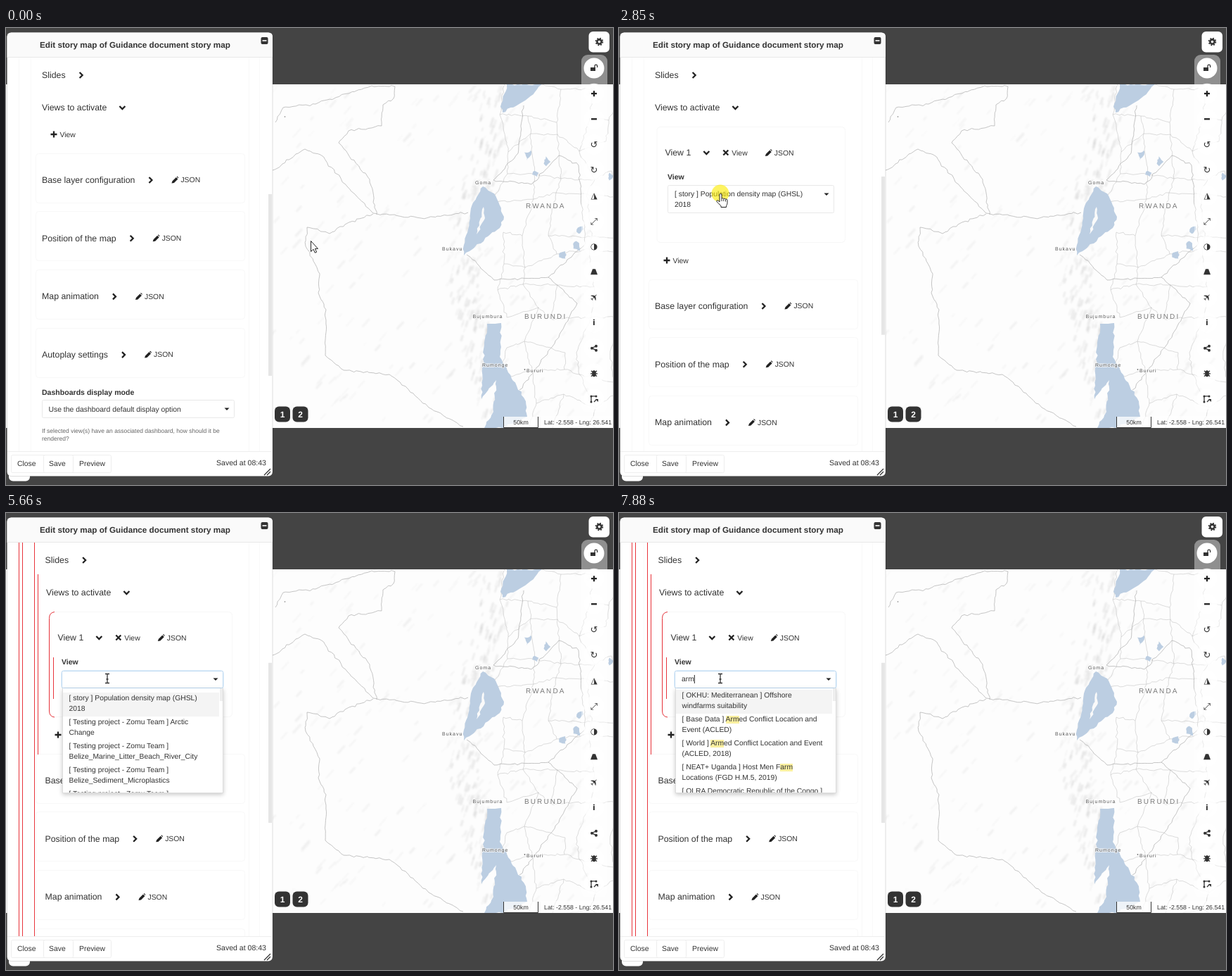
Write an HTML page that moves like this. It is 863 px wide and 649 px high and loops after 8000 ms.

```html
<!DOCTYPE html>
<html lang="en">
<head>
<meta charset="utf-8">
<title>Story map editor</title>
<style>
html, body { margin: 0; width: 863px; height: 649px; overflow: hidden; background: #444; }
svg { position: absolute; left: 0; top: 0; }
svg, #menu { font-family: "Liberation Sans", Arial, sans-serif; text-rendering: geometricPrecision; }
.tools { font-family: "DejaVu Sans", sans-serif; font-size: 13px; text-anchor: middle; }
.line { fill: none; stroke: #333; stroke-width: 1.3; }
.mark { fill: none; stroke: #222; stroke-width: 2.3; }
#menu { position: absolute; box-sizing: border-box; overflow: hidden; background: #fff; color: #333;
  border: 1px solid #ddd; border-top: 0; box-shadow: 0 2px 6px rgba(0,0,0,.22);
  font-size: 10.35px; line-height: 14.75px; white-space: nowrap; }
#menu p { margin: 0 5px 0 0; padding: 2.25px 0 2.25px 9px; }
#menu p:first-of-type { background: #f4f4f4; }
#menu i { position: absolute; right: 0; top: 0; width: 4px; height: 18px; background: #eee; }
mark { background: #faf0a0; color: inherit; }
</style>
</head>
<body>
<svg id="scene" width="863" height="649"></svg>
<div id="menu"></div>
<svg id="pointer" width="863" height="649"></svg>
<script>
const $ = id => document.getElementById(id);
const text = (x, y, s, size = 10.4, attr = '') =>
  `<text x="${x}" y="${y + size * .36}" font-size="${size}" ${attr}>${s}</text>`;
const rect = (x, y, w, h, fill, attr = '') =>
  `<rect x="${x}" y="${y}" width="${w}" height="${h}" fill="${fill}" ${attr}/>`;
const path = (d, attr = '') => `<path d="${d}" ${attr}/>`;
const at = (x, y, s) => `<g transform="translate(${x} ${y})">${s}</g>`;
const bold = 'font-weight="bold"';
const frame = (x, y, w, h, color, r = 2) => rect(x + .5, y + .5, w, h, 'none', `stroke="${color}" rx="${r}"`);

const pen = document.createElement('canvas').getContext('2d');
pen.textRendering = 'geometricPrecision';
function widthOf(s, size) {
  pen.font = `${size}px "Liberation Sans", Arial, sans-serif`;
  return pen.measureText(s).width;
}

let seed = 7;
const rnd = () => (seed = seed * 16807 % 2147483647) / 2147483647;
const jitter = size => (rnd() - .5) * size;

// Joins "x,y x,y ..." with small random kinks along each segment
function rough(points, kink = 3) {
  const p = points.split(' ').map(s => s.split(',').map(Number));
  let d = 'M' + p[0];
  for (let i = 1; i < p.length; i++) {
    const [ax, ay] = p[i - 1], [bx, by] = p[i];
    const n = Math.ceil(Math.hypot(bx - ax, by - ay) / 5);
    for (let k = 1; k <= n; k++) {
      const j = k < n ? kink : 0;
      d += `L${(ax + (bx - ax) * k / n + jitter(j)).toFixed(1)} ${(ay + (by - ay) * k / n + jitter(j)).toFixed(1)}`;
    }
  }
  return d;
}

const lakes = [
  '712,80 762,80 738,103 706,120 703,112 712,80',
  '678,225 694,235 708,268 702,284 685,296 651,323 651,308 660,270 662,253 678,225',
  '684,420 704,419 702,467 739,530 741,552 706,568 680,568 693,545 697,500 676,527 680,450 684,420'
];
const island = '679,254 669,293 681,270 679,254';
const ponds = '752,206 742,180 769,190 812,310 792,322 817,286 859,210';
const borders = [
  '383,134 394,113 440,108 520,82 553,83 551,100 536,109 534,139 487,146 473,163 517,215 527,265',
  '379,202 425,172 447,180 485,225 522,263 590,270 657,262',
  '522,264 482,279 460,292 428,283 426,310 446,349 444,376 455,400 454,465 480,486 545,492 605,541 650,566',
  '736,110 728,178 693,216 747,222 786,181 814,195 824,306 771,354 694,358 655,322',
  '771,354 812,391 780,448 730,514'
];

// District outlines: a shaken grid of nodes, joined to the next ones across and down
function districts() {
  const cell = 41, nodes = [];
  for (let r = 0; r < 13; r++)
    nodes.push([0, 1, 2, 3, 4].map(c => [702 + c * cell + jitter(28), 80 + r * cell + jitter(28)].map(Math.round)));
  return nodes.flatMap((row, r) => row.flatMap((n, c) =>
    [row[c + 1], nodes[r + 1] && nodes[r + 1][c]].filter(m => m && rnd() < .8).map(m => `${n} ${m}`)));
}

function pond(p) {
  const [x, y] = p.split(',').map(Number);
  const rim = [...Array(7).keys()].map(i => {
    const a = i / 7 * Math.PI * 2, r = 2.5 + rnd() * 6;
    return `${x + r * .8 * Math.cos(a)},${y + r * Math.sin(a)}`;
  });
  return [...rim, rim[0]].join(' ');
}

// Short soft strokes, half of them gathered along the rift valley
function hills() {
  let s = '';
  for (let i = 0; i < 460; i++) {
    const rift = i % 2, y = 82 + rnd() * 480;
    const x = rift ? 676 + 24 * Math.cos((y - 80) / 80) + jitter(44) : 382 + rnd() * 470;
    const l = 3 + rnd() * 9;
    s += path(`M${x.toFixed(1)} ${y.toFixed(1)}l${(-l * (rift ? .3 : .9)).toFixed(1)} ${l.toFixed(1)}`,
      `stroke-opacity="${((rift ? .045 : .02) + rnd() * .03).toFixed(3)}" stroke-width="${(1 + rnd() * 3).toFixed(1)}"`);
  }
  return `<g stroke="#000" stroke-linecap="round" filter="url(#soft)">${s}</g>`;
}

function map() {
  const fill = (p, color) => path(rough(p) + 'z', `fill="${color}"`);
  const line = (p, opacity) => path(rough(p), `fill="none" stroke="#aaa" stroke-width=".8" stroke-opacity="${opacity}"`);
  const place = (x, y, s, size, gap, color) =>
    text(x, y, s, size, `letter-spacing="${gap}" fill="${color}" stroke="#fff" stroke-opacity=".7" stroke-width="2" paint-order="stroke"`);
  const country = (x, y, s) => place(x, y, s, 10, 2.1, '#777');
  const town = (x, y, s) => place(x, y, s, 7, 1, '#555');
  return `<defs><filter id="soft"><feGaussianBlur stdDeviation="1.3"/></filter>
    <clipPath id="land"><path d="M0 80H863V568H0z"/></clipPath>
    <clipPath id="body"><path d="M1 42H379V601H1z"/></clipPath></defs>`
    + `<g clip-path="url(#land)">${rect(0, 80, 863, 488, '#fdfdfd')}${hills()}`
    + districts().map(p => line(p, .5)).join('') + borders.map(p => line(p, .85)).join('')
    + [...lakes, ...ponds.split(' ').map(pond)].map(p => fill(p, '#bccee2')).join('') + fill(island, '#fafafa')
    + '<circle cx="396.5" cy="126" r=".8" fill="#777"/><circle cx="737.5" cy="485" r=".9" fill="#777"/></g>'
    + country(739, 252, 'RWANDA') + country(737, 409, 'BURUNDI')
    + town(667, 219.5, 'Goma') + town(620, 313.5, 'Bukavu') + town(663.5, 409, 'Bujumbura')
    + town(677, 478, 'Rumonge') + town(740, 486, 'Bururi')
    + rect(707, 552, 50, 15, '#fff', 'fill-opacity=".75"') + path('M707.5 552v15.5h49V552', 'fill="none" stroke="#333"')
    + text(732, 559.5, '50km', 8.8, 'text-anchor="middle" fill="#333"')
    + rect(759, 551, 104, 17, '#fff', 'fill-opacity=".6"') + text(765, 559.5, 'Lat: -2.558 - Lng: 26.541', 8.77, 'fill="#333"')
    + [1, 2].map(n => rect(356.5 + n * 25.5, 537.5, 22, 22, '#333', 'rx="6"')
      + text(367.5 + n * 25.5, 548.5, n, 12, bold + ' fill="#fff" text-anchor="middle"')).join('');
}

const glyph = (s, size = 13) => text(0, 0, s, size);
const dots = (r, ...points) => points.map(([x, y]) => `<circle cx="${x}" cy="${y}" r="${r}"/>`).join('');
const tools = [
  rect(-5, -1, 7, 5, '#333') + path('M1-1v-2a1.8 1.8 0 0 1 3.6 0v2', 'class="line"'),
  path('M-4 0h8M0-4v8', 'class="mark"'), path('M-4 0h8', 'class="mark"'),
  glyph('↺'), glyph('↻'), glyph('◮', 12), glyph('⤢'), glyph('◑', 12),
  path('M-5 4-2-4h4l3 8z'),
  `<g transform="rotate(-45)">${glyph('✈', 14)}</g>`,
  text(0, 0, 'i', 11, bold),
  dots(2, [-3, 0], [3, -3], [3, 3]) + path('M3-3-3 0 3 3', 'class="line"'),
  '<ellipse rx="2.8" ry="4.5"/>' + path('M-4-4 4 4M4-4-4 4M-5 0H5', 'class="line"'),
  dots(1.5, [-4, -4], [3, -4], [-4, 4]) + path('M3-4h-7v8M0 4 4 0', 'class="line"') + path('M2 0h4v4z')
];

function chrome() {
  return rect(828.5, 5, 29.5, 29.5, '#fff', 'rx="6"')
    + at(843.5, 19.5, '<g fill="none" stroke="#333"><circle r="3.1" stroke-width="2.6"/><circle r="4.9" stroke-width="1.7" stroke-dasharray="1.95 1.9"/></g>')
    + rect(818, 38, 37, 508, '#fff', 'rx="9" fill-opacity=".4"')
    + `<g class="tools">${tools.map((icon, i) => at(836, 57 + i * 36.15,
      `<circle r="14.5" fill="#fff" fill-opacity="${i ? .8 : 1}"/>${icon}`)).join('')}</g>`
    + rect(4, 620, 30, 23.5, '#fff', 'rx="6"')
    + rect(1.5, 6.5, 377.5, 630, '#fff', 'rx="6" stroke="#000" stroke-opacity=".13"')
    + path('M1.5 42V12.5q0-6 6-6H373q6 0 6 6V42z', 'fill="#fafafa"') + rect(2, 41, 377, 1, '#e8e8e8')
    + text(48, 23.5, 'Edit story map of Guidance document story map', 11.72, bold)
    + rect(362.5, 13, 10, 10, '#333', 'rx="2"') + rect(364.5, 17.2, 6, 1.6, '#fff')
    + rect(2, 601, 377, 1, '#eee') + frame(7, 606, 142, 25, '#eee') + frame(53, 606, 42, 25, '#eee')
    + text(16, 618.5, 'Close') + text(61, 618.5, 'Save') + text(104, 618.5, 'Preview')
    + text(299, 617, 'Saved at 08:43', 10.55)
    + path('M367 635l9-9M371 635l5-5', 'class="line"');
}

const plus = (x, y) => path(`M${x} ${y}h9M${x + 4.5} ${y - 4.5}v9`, 'class="mark"');
const json = (x, y) => at(x, y, path('M0 5 1 2 6.5-3.5 9-1 3.5 4.5zM7.2-4.2 8-5l2 2-.8.8z', 'fill="#222"')) + text(x + 13, y, 'JSON');
const arrow = (x, y) => path(`M${x - 3.5} ${y - 1.5}h7l-3.5 3.5z`, 'fill="#222"');
const chevronAfter = (x, s) => x + widthOf(s, 12.35) + 22;
const title = (x, y, s, open) => text(x, y, s, 12.35)
  + at(chevronAfter(x, s), y + .5, path(open ? 'M-4-2 0 2 4-2' : 'M-2-4 2 0-2 4', 'class="mark"'));

const sections = ['Base layer configuration', 'Position of the map', 'Map animation', 'Autoplay settings'];
const fieldHeights = [0, 39, 54, 24];

function viewBlock({ stage, typed, caretOn }) {
  const last = stage == 3, x = last ? 73.5 : 65.5, left = last ? 79 : 69, w = last ? 229 : 236;
  const h = fieldHeights[stage], focus = stage > 1;
  const chevron = chevronAfter(x, 'View 1');
  let s = frame(x - 12, 140, 268 - (x - 65), h + 125, '#f7f7f7', 5)
    + title(x, 176.5, 'View 1', true)
    + path(`M${chevron + 24} 173.5l7 7m0-7-7 7`, 'class="mark"')
    + text(chevron + 36, 177, 'View') + json(chevron + 83.5, 177)
    + text(left, 211.5, 'View', 10.5, bold);
  if (focus) s += frame(left - 1, 223, w + 2, h + 2, '#e3effa', 4);
  s += rect(left + .5, 223.5 + focus, w, h, '#fff', `rx="2" stroke="${focus ? '#bcd9f2' : '#e8e8e8'}"`)
    + arrow(left + w - 10, stage == 2 ? 265 : 236);
  s += last ? text(89, 235.5, typed, 10.35)
    : text(79, 235.5, '[ story ] Population density map (GHSL)', 10.35) + text(79, 250.5, '2018', 10.35);
  if (caretOn) s += rect(last ? 89 + widthOf(typed, 10.35) : 79, last ? 230 : 260, 1, 12, '#222');
  return s;
}

function panel(state) {
  const { stage, pressed } = state, last = stage == 3;
  const x = last ? 55.5 : 51, viewsX = last ? 57 : 51, shift = stage && fieldHeights[stage] + 140;
  let s = [18, 35, 345, 360].map(g => rect(g, 42, 1, 559, '#f9f9f9')).join('')
    + title(x, 66.5, 'Slides') + title(viewsX, 112.5, 'Views to activate', true);
  if (pressed) s += rect(54.5, 140.5, 52, 23, '#eee', 'rx="2" stroke="#ddd"');
  s += plus(viewsX + 12.5, 151 + shift) + text(viewsX + 25.5, 151.5 + shift, 'View');
  sections.forEach((label, i) => {
    const y = 215.5 + shift + i * 82.7;
    s += frame(42, Math.round(y - 38), 297, 70, '#f8f8f8', 4)
      + title(x, y, label) + json(chevronAfter(x, label) + 30, y);
  });
  if (stage) s += viewBlock(state);
  else s += text(51, 517, 'Dashboards display mode', 10.55, bold)
    + frame(51, 528, 273, 25, '#e8e8e8') + text(60.5, 541, 'Use the dashboard default display option') + arrow(314, 541)
    + `<g fill="#666">${text(51, 572, 'If selected view(s) have an associated dashboard, how should it be', 8.52)}${text(51, 583, 'rendered?', 8.52)}</g>`;
  if (last) s += path('M18.5 42V601M23.5 42V601M40.5 42V601M45.5 87V343M69 140.5q-7.5 1-7.5 9V281q0 8 7.5 9M67.5 205V264', 'fill="none" stroke="#e8333a"');
  // Scroll thumb for a fixed scroll offset in content that grows
  const seen = 559, ratio = seen / (1211 + shift);
  s += rect(373, 42 + 420 * ratio, 5, seen * ratio, '#e6e6e6');
  return `<g clip-path="url(#body)" fill="#333">${s}</g>`;
}

const team = '[ Testing project - Zomu Team ]';
const layers = ['Belize_Marine_Litter_Beach_River_City', 'Belize_Sediment_Microplastics', 'CM_GLOBAL/Synthesis_Maps']
  .map(s => `${team}<br>${s}`);
const wide = ['[ story ] Population density map (GHSL) 2018', `${team} Arctic Change`, ...layers];
const narrow = ['[ story ] Population density map (GHSL)<br>2018', `${team} Arctic<br>Change`, ...layers];
const found = ['[ OKHU: Mediterranean ] Offshore<br>windfarms suitability',
  '[ Base Data ] Armed Conflict Location and<br>Event (ACLED)', '[ World ] Armed Conflict Location and Event<br>(ACLED, 2018)',
  '[ NEAT+ Uganda ] Host Men Farm<br>Locations (FGD H.M.5, 2019)', '[ OLRA Democratic Republic of the Congo ]<br>Farms'];

function drawMenu({ stage, query }) {
  const menu = $('menu');
  menu.hidden = stage < 2;
  if (menu.hidden) return;
  const [x, y, w, pad] = stage == 2 ? [69, 279, 237, 4.3] : [79.5, 249, 229, query ? 2 : 5.5];
  menu.style.cssText = `left:${x}px;top:${y}px;width:${w}px;height:148.5px;padding-top:${pad}px`;
  const list = stage == 2 ? wide : query ? found : narrow;
  menu.innerHTML = '<i></i>' + list.map((s, i) =>
    `<p>${query && i ? s.replace(new RegExp(query, 'i'), '<mark>$&</mark>') : s}</p>`).join('');
}

const outline = 'fill="#fff" stroke="#222" stroke-linejoin="round"';
const shapes = {
  arrow: path('M.5.5V15.5L4 12.2l2.3 5 2.3-1-2.2-4.8h4.1z', outline),
  hand: path('M-1 1q1.5-1.6 3 0V7q1.5-1 2.8.4 1.5-.8 2.7.5 2-.5 2.5 1.6v4q0 2-1.5 4v2H1v-2Q-2 15-5 11.5q-.5-2 1.5-1.7L-1 12z', outline)
    + path('M2 7v4M4.8 8v3M7.5 8.5v3', 'stroke="#222" stroke-width=".9"'),
  beam: path('M-3-6.5h2.5l.5.5.5-.5H3M0-6V6M-3 6.5h2.5L0 6l.5.5H3M-1.5 1h3', 'class="line"')
};

function drawPointer({ x, y, click, shape }) {
  $('pointer').innerHTML = (click ? `<circle cx="${x}" cy="${y}" r="12.5" fill="#fbec00" fill-opacity=".62"/>` : '')
    + at(x, y, shapes[shape]);
}

// Eased 0 to 1 in n visible steps, the first at t0 and the last at t1
function glide(t, t0, t1, n) {
  if (t < t0) return 0;
  const p = Math.min(1, (1 + Math.floor((t - t0) / (t1 - t0) * (n - 1) + .05)) / n);
  return p * p * (3 - 2 * p);
}

function stateAt(t) {
  const within = (a, b) => t >= a && t < b;
  const passed = (...times) => times.filter(s => s <= t).length;
  const toButton = glide(t, 200, 1220, 6), toField = glide(t, 1640, 2450, 5);
  return {
    x: 433 - 338 * toButton + 49 * toField,
    y: 302 - 150 * toButton + 83 * toField,
    stage: passed(1640, 3050, 5660),
    pressed: within(1450, 1640),
    click: within(1450, 1640) || within(2650, 3050),
    shape: t >= 3050 ? 'beam' : within(1020, 1640) || t >= 2250 ? 'hand' : 'arrow',
    caretOn: passed(3050, 3450, 4040, 4470, 5060, 5660, 6070, 6670, 6860) % 2 == 1,
    typed: 'arm'.slice(0, passed(6860, 7060, 7690)),
    query: t >= 7880 ? 'arm' : t >= 7060 ? 'ar' : ''
  };
}

$('scene').innerHTML = `${map()}<g fill="#333">${chrome()}</g><g id="content"></g>`;
const start = performance.now();
let shown = '';
function tick() {
  const state = stateAt((performance.now() - start) % 8000), key = JSON.stringify(state);
  if (key != shown) {
    shown = key;
    $('content').innerHTML = panel(state);
    drawMenu(state);
    drawPointer(state);
  }
  requestAnimationFrame(tick);
}
tick();
</script>
</body>
</html>
```
